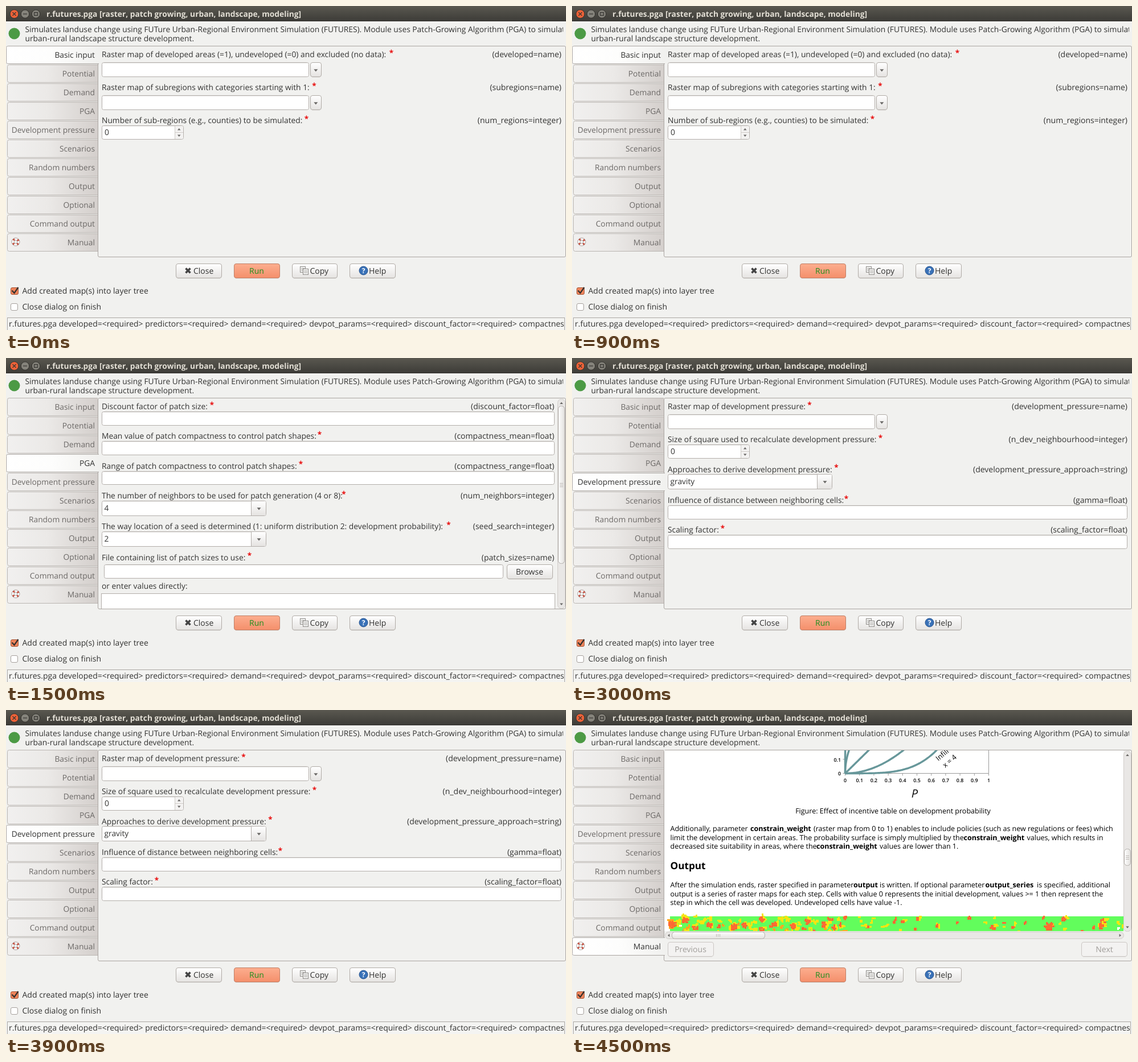
Recreate the animation shown at these times as an HTML page. Size 983 by 570 pixels, loop 6000 ms.

```html
<!DOCTYPE html>
<html lang="en">
<head>
<meta charset="utf-8">
<title>r.futures.pga</title>
<style>
html, body { margin: 0; width: 100%; height: 100%; overflow: hidden; background: #f1f1ef; }
svg { display: block; width: 983px; height: 570px; }
text { font-family: "Open Sans", "Noto Sans", sans-serif; font-size: 13.8px; fill: #333332; white-space: pre; text-rendering: geometricPrecision; }
.bold { font-weight: 700; }
.large { font-size: 14px; }
.doc { font-size: 12.5px; fill: #000; }
.tick { font-size: 8.8px; font-weight: 600; fill: #000; }
.star { font-size: 13.5px; font-weight: 700; fill: #e80c0c; }
</style>
</head>
<body>
<svg id="stage" viewBox="0 0 983 570">
  <defs>
    <linearGradient id="title" x2="0" y2="1"><stop stop-color="#5a5850"/><stop offset="1" stop-color="#3c3b37"/></linearGradient>
    <linearGradient id="tab"><stop stop-color="#f1f0ef"/><stop offset=".45" stop-color="#ebe9e7"/><stop offset="1" stop-color="#d4cfcc"/></linearGradient>
    <linearGradient id="active"><stop stop-color="#fff"/><stop offset=".5" stop-color="#fdfdfc"/><stop offset="1" stop-color="#f1f1ef"/></linearGradient>
    <linearGradient id="button" x2="0" y2="1"><stop stop-color="#fff"/><stop offset="1" stop-color="#e5e3e1"/></linearGradient>
    <linearGradient id="run" x2="0" y2="1"><stop stop-color="#fcae8f"/><stop offset="1" stop-color="#f48f6b"/></linearGradient>
    <linearGradient id="thumbV"><stop stop-color="#fdfdfd"/><stop offset="1" stop-color="#e3e1de"/></linearGradient>
    <linearGradient id="thumbH" x2="0" y2="1"><stop stop-color="#fdfdfd"/><stop offset="1" stop-color="#e3e1de"/></linearGradient>
    <clipPath id="headClip"><rect x="0" y="28" width="978" height="40"/></clipPath>
    <clipPath id="cmdClip"><rect x="3" y="549" width="977" height="21"/></clipPath>
    <clipPath id="panelClip"><rect x="162" y="71" width="820" height="370"/></clipPath>
    <clipPath id="docClip"><rect x="162" y="71" width="806" height="318"/></clipPath>
  </defs>
</svg>
<script>
const STEP = 1500;
const stage = document.getElementById('stage');
const LINE = '#b3aeaa';

const esc = s => s.replace(/&/g, '&amp;').replace(/</g, '&lt;').replace(/>/g, '&gt;');
const text = (x, y, s, attr = '') => `<text x="${x}" y="${y}" ${attr}>${esc(s)}</text>`;
const end = (x, y, s, attr = '') => text(x, y, s, 'text-anchor="end" ' + attr);
const mid = (x, y, s, attr = '') => text(x, y, s, 'text-anchor="middle" ' + attr);
const rect = (x, y, w, h, fill) => `<rect x="${x}" y="${y}" width="${w}" height="${h}" fill="${fill}"/>`;
const path = (d, attr) => `<path d="${d}" ${attr}/>`;
const circle = (x, y, r, attr) => `<circle cx="${x}" cy="${y}" r="${r}" ${attr}/>`;

// Bordered box given by its outer pixel edges
const box = (x0, y0, x1, y1, fill = '#fff', r = 3, line = LINE) =>
  `<rect x="${x0 + .5}" y="${y0 + .5}" width="${x1 - x0}" height="${y1 - y0}" rx="${r}" fill="${fill}" stroke="${line}"/>`;

const arrow = (x, y, turn = 0, size = 3.5) =>
  path(`M${-size} ${-size / 2}H${size}L0 ${size * .7}Z`, `transform="translate(${x} ${y}) rotate(${turn})" fill="#6a6866"`);

const field = (x0, y0, x1, y1) =>
  box(x0, y0, x1, y1) + path(`M${x0 + 3} ${y0 + 1.5}H${x1 - 2}`, 'stroke="#ecebe9"');

const button = (x0, y0, x1, y1, fill = 'url(#button)', line = '#b0aba6') =>
  path(`M${x0 + 3} ${y1 + 1.5}H${x1 - 2}`, 'stroke="#e4e2e0"') + box(x0, y0, x1, y1, fill, 3.5, line);

const combo = y => field(168, y, 531, y + 25) + button(534, y, 553, y + 25) + arrow(543.8, y + 14);

const spin = (y, value) => field(168, y, 311, y + 24) +
  path(`M296.5 ${y + 1}h12q2 0 2 2v19q0 2 -2 2h-12z`, 'fill="#f3f2f1"') +
  path(`M296.5 ${y + 1}v23M297 ${y + 12.5}h14`, 'stroke="#d0ccc8" fill="none"') +
  arrow(303.8, y + 7, 180, 2.8) + arrow(303.8, y + 18, 0, 2.8) + text(173, y + 17, value);

const select = (y, value) => field(168, y, 456, y + 26) +
  path(`M431 ${y + 1}h23q2 0 2 2v21q0 2 -2 2h-23z`, 'fill="url(#button)"') +
  path(`M430.5 ${y + 1}v25`, `stroke="${LINE}"`) + arrow(444, y + 14) + text(172.5, y + 18, value);

const label = (y, s, starX, key, right) =>
  text(168, y, s) + mid(starX, y - 3.5, '*', 'class="star"') + end(right, y, key, 'class="large"');

const scrollV = (y0, y1, t0, t1) => box(968, y0, 981, y1, '#e9e7e5', 6, '#d0ccc9') +
  box(969, t0, 980, t1, 'url(#thumbV)', 5) +
  arrow(975, y0 + 7.5, 180, 2.8) + arrow(975, y1 - 7, 0, 2.8) +
  [-3, 0, 3].map(d => path(`M972 ${Math.round((t0 + t1) / 2) + d + .5}h6`, 'stroke="#bbb7b3"')).join('');

const scrollH = (x0, x1, t0, t1) => box(x0, 390, x1, 402, '#e9e7e5', 6, '#d0ccc9') +
  box(t0, 390, t1, 402, 'url(#thumbH)', 5) +
  arrow(x0 + 7, 396.5, 90, 2.8) + arrow(x1 - 6, 396.5, -90, 2.8) +
  [-3, 0, 3].map(d => path(`M${Math.round((t0 + t1) / 2) + d - .5} 394v5`, 'stroke="#bbb7b3"')).join('');

const tabs = ['Basic input', 'Potential', 'Demand', 'PGA', 'Development pressure', 'Scenarios',
  'Random numbers', 'Output', 'Optional', 'Command output', 'Manual'];

const ring = () => circle(17, 415, 5, 'fill="none" stroke="#fff" stroke-width="3.6"') +
  circle(17, 415, 5, 'fill="none" stroke="#c9503f" stroke-width="3.6" stroke-dasharray="2.85 5" stroke-dashoffset="-2.5"') +
  circle(17, 415, 7, 'fill="none" stroke="#8a7a77" stroke-width=".7"') +
  circle(17, 415, 3.1, 'fill="#f1f0ef" stroke="#8a7a77" stroke-width=".7"');

function tab(i, on) {
  const y = 70 + 33 * i, x = on ? .5 : 2.5, right = on ? 163 : 161;
  return path(`M${right} ${y + .5}H${x + 3}q-3 0 -3 3V${y + 28.5}q0 3 3 3H${right}`,
      `fill="url(#${on ? 'active' : 'tab'})" stroke="${on ? '#aaa5a1' : '#bab5b1'}"`) +
    end(156, y + 21, tabs[i], on ? '' : 'style="fill:#6c6967"') +
    (i === 10 ? `<g transform="translate(${on ? -2 : 0} 0)">${ring()}</g>` : '');
}

function frame() {
  const dark = 'stroke="#3a3935" fill="none" stroke-width="1.3"';
  const windowKeys = circle(14.5, 14, 7.5, 'fill="#ee6238" stroke="#33322e"') + path('M11.5 11l6 6m0 -6l-6 6', dark) +
    circle(33.5, 14, 7.2, 'fill="#85837b" stroke="#33322e"') + path('M30 14h7', dark) +
    circle(52.5, 14, 7.2, 'fill="#85837b" stroke="#33322e"') + path('M49.5 11.5h6v5h-6z', dark);
  const head = '<g clip-path="url(#headClip)">' +
    text(33.5, 46, 'Simulates landuse change using FUTure Urban-Regional Environment Simulation (FUTURES). Module uses Patch-Growing Algorithm (PGA) to simulate') +
    text(33.5, 62, 'urban-rural landscape structure development.') + '</g>';
  const copyIcon = [[516, 458], [521, 462]].map(([x, y]) => box(x, y, x + 9, y + 10, '#f4f4f3', 0, '#8c8a87') +
    path(`M${x + 2} ${y + 3.5}h6m-6 2h6m-6 2h6`, 'stroke="#b5b3b0"')).join('');
  const buttons = button(298, 453, 378, 478) +
    path('M315.5 461.5l8 8m0 -8l-8 8', 'stroke="#444" stroke-width="3.6"') + text(329, 471, 'Close', 'class="large"') +
    button(400, 453, 480, 478, 'url(#run)', '#c07f66') + mid(440, 471, 'Run', 'class="large" style="fill:#1c8f1c"') +
    button(502, 453, 581, 478) + copyIcon + text(533.5, 471, 'Copy', 'class="large"') +
    button(603, 453, 683, 478) + circle(627.5, 465.5, 7.5, 'fill="#3a72b8" stroke="#24508c"') +
    mid(627.5, 470, '?', 'class="bold" style="fill:#fff;font-size:12px"') + text(637, 471, 'Help', 'class="large"');
  const checks = box(8, 495, 21, 507, '#f0855c', 2.5, '#a4573a') +
    path('M10.5 500.5l4 4.5l7 -10', 'fill="none" stroke="#33302e" stroke-width="2.2"') +
    text(28.5, 506, 'Add created map(s) into layer tree', 'class="large"') +
    box(8, 523, 20, 535, '#fff', 2.5, '#a5a09c') + text(28.5, 534, 'Close dialog on finish', 'class="large"');
  const command = box(2, 548, 980, 574, '#f4f4f2', 0, '#aaa6a2') + '<g clip-path="url(#cmdClip)">' +
    text(5, 564, 'r.futures.pga developed=<required> predictors=<required> demand=<required> devpot_params=<required> discount_factor=<required> compactnes', 'class="large"') + '</g>';
  return rect(0, 0, 983, 570, '#f1f1ef') + rect(0, 0, 983, 27, 'url(#title)') + rect(0, 26, 983, 1, '#33322e') +
    windowKeys + text(71, 19, 'r.futures.pga [raster, patch growing, urban, landscape, modeling]', 'class="bold" style="fill:#e4e0d6"') +
    circle(14.5, 48.5, 10, 'fill="#4c9a45"') + head +
    tabs.map((_, i) => tab(i, false)).join('') + box(161, 70, 982, 441, '#f1f1ef', 2.5, '#aaa5a1') +
    buttons + checks + command;
}

const basic = () =>
  label(90, 'Raster map of developed areas (=1), undeveloped (=0) and excluded (no data):', 676.5, '(developed=name)', 975) + combo(99) +
  label(148, 'Raster map of subregions with categories starting with 1:', 541, '(subregions=name)', 975) + combo(157) +
  label(206, 'Number of sub-regions (e.g., counties) to be simulated:', 527.5, '(num_regions=integer)', 975) + spin(210, '0');

const growth = () =>
  label(90, 'Discount factor of patch size:', 361.5, '(discount_factor=float)', 962.5) + field(168, 94, 962, 118) +
  label(142, 'Mean value of patch compactness to control patch shapes:', 550.5, '(compactness_mean=float)', 962.5) + field(168, 146, 962, 170) +
  label(194.5, 'Range of patch compactness to control patch shapes:', 517.5, '(compactness_range=float)', 962.5) + field(168, 199, 962, 222) +
  label(247, 'The number of neighbors to be used for patch generation (4 or 8):', 593, '(num_neighbors=integer)', 962.5) + select(251, '4') +
  label(301, 'The way location of a seed is determined (1: uniform distribution 2: development probability):', 777, '(seed_search=integer)', 962.5) + select(305, '2') +
  label(355.5, 'File containing list of patch sizes to use:', 427.5, '(patch_sizes=name)', 962.5) + field(172, 363, 872, 387) +
  button(879, 363, 959, 388) + mid(919, 381, 'Browse', 'class="large"') +
  text(168, 406, 'or enter values directly:') + box(167, 414, 963, 450, '#fff', 0) +
  scrollV(72, 440, 84, 361);

const pressure = () =>
  label(90, 'Raster map of development pressure:', 417, '(development_pressure=name)', 975) + combo(99) +
  label(148, 'Size of square used to recalculate development pressure:', 541.5, '(n_dev_neighbourhood=integer)', 975) + spin(152, '0') +
  label(200.5, 'Approaches to derive development pressure:', 464, '(development_pressure_approach=string)', 975) + select(204, 'gravity') +
  label(255, 'Influence of distance between neighboring cells:', 481.5, '(gamma=float)', 975) + field(168, 259, 974, 283) +
  label(307, 'Scaling factor:', 264.5, '(scaling_factor=float)', 975) + field(168, 311, 974, 335);

// Power curves p^k rising from the chart's lower left corner
function chart() {
  const X = 479.5, Y = 111.5, W = 252, H = 248;
  const grey = 'fill="none" stroke="#9a9a9a"';
  let out = path(`M${X} 60V${Y}H${X + W}V60M${X - 4} ${Y}h4m-4 -24.8h4`, grey) +
    end(472, 115, '0', 'class="tick"') + end(472, 90.5, '0.1', 'class="tick"');
  for (let i = 0; i <= 10; i++) {
    const x = X + W * i / 10;
    out += path(`M${x} ${Y}v4`, grey) + mid(x, 127, String(i / 10), 'class="tick"');
  }
  for (const k of [.25, .5, 1, 2, 4]) {
    const top = .25 ** (1 / k);
    const pts = Array.from({ length: 81 }, (_, i) => {
      const p = top * (i / 80) ** Math.max(1, 2 / k);
      return (X + W * p).toFixed(2) + ',' + (Y - H * p ** k).toFixed(2);
    });
    out += `<polyline points="${pts.join(' ')}" fill="none" stroke="#67979a" stroke-width="3.4"/>`;
  }
  return out +
    `<g transform="translate(643 90) rotate(-40)">${text(0, 0, 'Infill', 'class="doc"')}</g>` +
    `<g transform="translate(655 102) rotate(-40)">${text(0, 0, 'x = 4', 'class="doc"')}</g>` +
    mid(601.5, 154, 'P', 'style="font-size:20px;font-style:italic;fill:#111"');
}

// Strip of developed cells: seeded random walks, dense at the left
function strip() {
  let seed = 17;
  const rnd = () => (seed = seed * 16807 % 2147483647) / 2147483647;
  const clump = (cx, cy, n, reach, fill) => {
    let d = '', x = 0, y = 0;
    for (let i = 0; i < n; i++) {
      d += `M${Math.round(cx) + x - 1} ${Math.round(cy) + y - 1}h3v3h-3z`;
      const step = rnd() < .5 ? -2 : 2;
      if (rnd() < .5) x += step; else y += step;
      if (Math.hypot(x, y) > reach) x = y = 0;
    }
    return path(d, `fill="${fill}"`);
  };
  const red = '#ff6a33', yellow = '#f4e512';
  let out = rect(172, 363, 797, 27, '#62fd5c');
  for (let i = 0; i < 85; i++)
    out += clump(172 + 310 * rnd() ** 1.25, 363 + 27 * rnd(), 4 + 9 * rnd(), 7, i % 3 ? yellow : i % 2 ? red : '#ffa81f');
  for (let i = 0; i < 34; i++)
    out += clump(470 + 500 * rnd(), 363 + 27 * rnd(), 2 + 6 * rnd(), 5, i % 3 ? yellow : red);
  const towns = [[176, 376, 7], [198, 369, 6], [241, 378, 5], [284, 382, 6], [302, 379, 5], [333, 368, 5], [356, 377, 4],
    [387, 380, 5], [413, 372, 5], [441, 377, 5], [460, 382, 4], [580, 373, 3], [607, 367, 3], [641, 379, 3],
    [738, 383, 5], [837, 380, 8], [862, 368, 4], [932, 373, 6], [928, 380, 5]];
  for (const [x, y, r] of towns)
    out += clump(x + 3, y - 2, r * 3, r + 2, yellow) + clump(x, y, r * r * 1.6, r, red);
  return out + clump(189, 379, 3, 2, '#fff') + clump(958, 385, 5, 3, '#fff');
}

function manual() {
  const b = 'class="doc bold"', d = 'class="doc"';
  const words = [
    [172.5, 213, 'Additionally, parameter', d], [313, 213, 'constrain_weight', b],
    [424, 213, '(raster map from 0 to 1) enables to include policies (such as new regulations or fees) which', d],
    [172.5, 228.5, 'limit the development in certain areas. The probability surface is simply multiplied by the', d],
    [687.5, 228.5, 'constrain_weight', b], [798.5, 228.5, 'values, which results in', d],
    [172.5, 244, 'decreased site suitability in areas, where the', d], [429, 244, 'constrain_weight', b],
    [540, 244, 'values are lower than 1.', d],
    [172.5, 280, 'Output', 'class="bold" style="font-size:17.2px;fill:#000"'],
    [172.5, 312, 'After the simulation ends, raster specified in parameter', d], [494, 312, 'output', b],
    [540, 312, 'is written. If optional parameter', d], [725.5, 312, 'output_series', b],
    [816, 312, 'is specified, additional', d],
    [172.5, 327.5, 'output is a series of raster maps for each step. Cells with value 0 represents the initial development, values >= 1 then represent the', d],
    [172.5, 343, 'step in which the cell was developed. Undeveloped cells have value -1.', d]];
  const faint = 'class="large" style="fill:#a09d9a"';
  return '<g clip-path="url(#docClip)">' + rect(162, 71, 806, 318, '#fff') + chart() +
    mid(563.5, 182, 'Figure: Effect of incentive table on development probability', d) +
    words.map(w => text(...w)).join('') + strip() + '</g>' +
    scrollV(72, 389, 244, 273) + scrollH(163, 968, 175, 338) +
    button(168, 408, 248, 433, '#f3f2f1', '#cbc7c4') + mid(208, 426, 'Previous', faint) +
    button(894, 408, 974, 433, '#f3f2f1', '#cbc7c4') + mid(934.5, 426, 'Next', faint);
}

const pages = [[0, basic], [3, growth], [4, pressure], [10, manual]];
stage.insertAdjacentHTML('beforeend', frame() + pages.map(([i, draw]) =>
  `<g class="page">${tab(i, true)}<g clip-path="url(#panelClip)">${draw()}</g></g>`).join(''));

document.querySelectorAll('.page').forEach((page, i) => {
  const steps = [0, 1, 2, 3, 4].map(k => ({ opacity: k % 4 === i ? 1 : 0, easing: 'step-end' }));
  page.animate(steps, { duration: 4 * STEP, iterations: Infinity });
});
</script>
</body>
</html>
```
